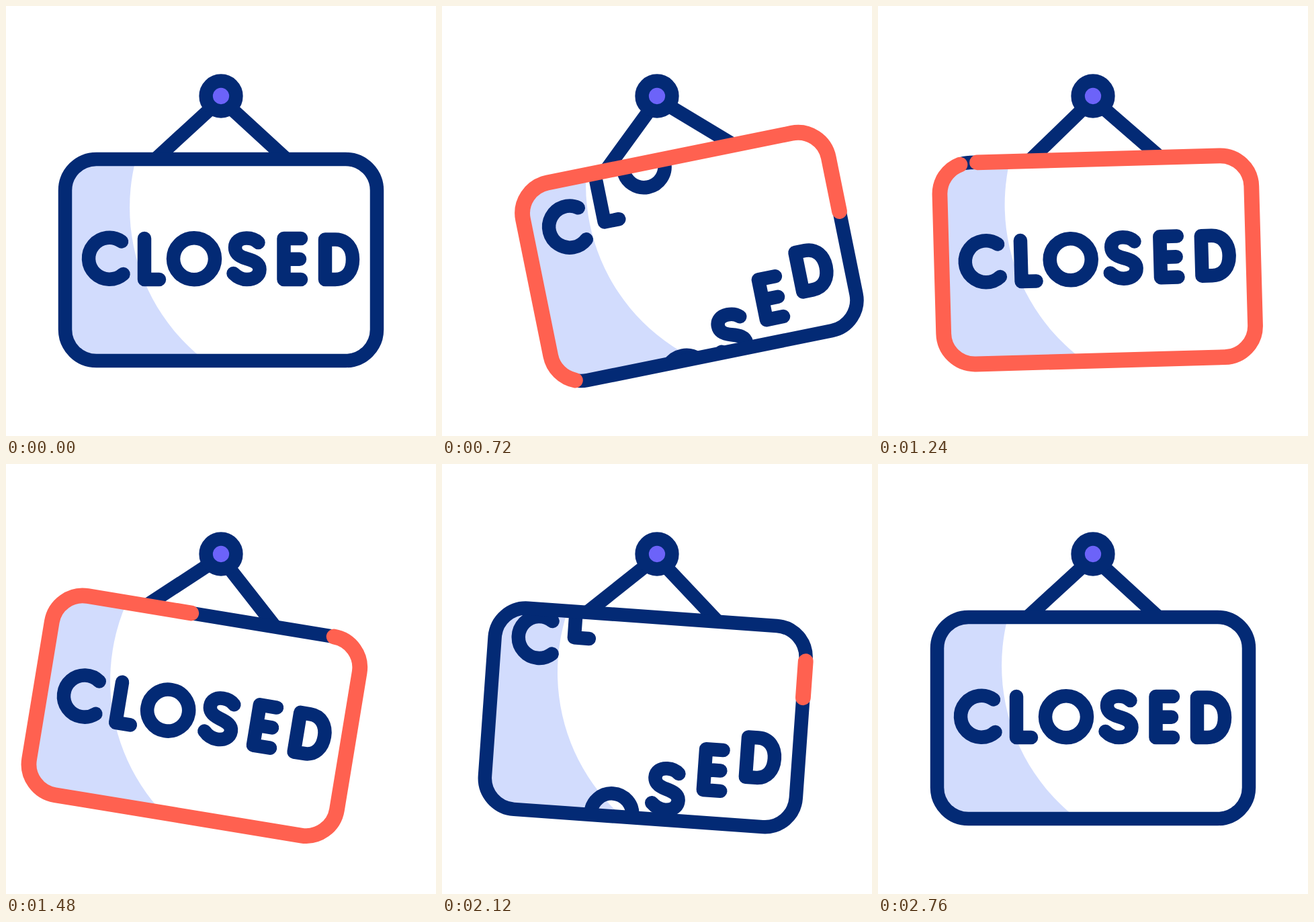
Write an HTML page that moves like this. It is 640x640 px and loops after 3 s.

```html
<!DOCTYPE html>
<html lang="en">
<head>
<meta charset="utf-8">
<title>Closed sign</title>
<style>
  html, body { margin: 0; width: 100%; height: 100%; overflow: hidden; background: #fff; }
  svg { display: block; width: 100vw; height: 100vh; }
  .line { fill: none; stroke: #032a75; stroke-width: 20.5; stroke-linecap: round; stroke-linejoin: round; }
</style>
</head>
<body>
<svg viewBox="0 0 640 640" role="img" aria-label="CLOSED">
  <defs>
    <clipPath id="inside"><rect x="88" y="228" width="464" height="300" rx="46.5"/></clipPath>
    <mask id="shade">
      <rect width="640" height="640" fill="#fff"/>
      <circle cx="471.3" cy="300" r="287.2" fill="#000"/>
    </mask>
  </defs>
  <g id="sign">
    <path class="line" d="M222.5 228 320 138.5 417.5 228"/>
    <g clip-path="url(#inside)">
      <rect x="88" y="228" width="464" height="300" fill="#fff"/>
      <rect x="88" y="228" width="240" height="300" fill="#d2dcfd" mask="url(#shade)"/>
      <g id="word"></g>
    </g>
    <rect class="line" x="88" y="228" width="464" height="300" rx="46.5"/>
    <rect id="trail" class="line" x="88" y="228" width="464" height="300" rx="46.5" pathLength="1"
      style="stroke:#ff6150;stroke-width:22.8"/>
  </g>
  <circle cx="320" cy="134" r="22.4" class="line" style="fill:#6c63f9"/>
</svg>
<script>
const LOOP = 3000, DROP_TIME = 840;
const DROPS = [
  { start: 277, stagger: 37, distance: 318 },
  { start: 1710, stagger: 33.4, distance: 332 }
];
const GLYPHS = [
  'M172 350.5A31 31 0 1 0 174.5 399',
  'M206 346V407H228',
  'M249 376.3a31 31 0 1 1 62 0a31 31 0 1 1-62 0',
  'M375.5 352C371 347.5 365 345.5 358 345.5C348 345.5 341 351 341 359.5C341 369 348 373 358 376' +
    'C370 379.5 377.5 383 377.5 392C377.5 401 370 407 358.5 407C350 407 343 402.5 338.5 398',
  'M439 346H413.5V407H439M413.5 376.7H437',
  'M475 347.5H490C507 347.5 516 361 516 377C516 394 507 407 490 407H475Z'
];
const $ = id => document.getElementById(id);
const sign = $('sign'), trail = $('trail'), word = $('word');

// Each glyph has a twin that follows it in from above.
word.innerHTML = GLYPHS.map(d => `<path class="line" d="${d}"/>`.repeat(2)).join('');
const glyphs = [...word.children];

// Progress of cubic-bezier(x1, 0, x2, 1) between two times.
function ease(t, start, end, x1 = 0.504, x2 = 0.268) {
  const x = (t - start) / (end - start);
  if (x <= 0) return 0;
  if (x >= 1) return 1;
  let lo = 0, hi = 1, s = 0.5;
  for (let i = 0; i < 24; i++) {
    s = (lo + hi) / 2;
    const r = 1 - s;
    if (3 * r * r * s * x1 + 3 * r * s * s * x2 + s ** 3 < x) lo = s; else hi = s;
  }
  return s * s * (3 - 2 * s);
}

function swing(t) {
  return -12.2 * ease(t, 205, 910) + 23.5 * ease(t, 920, 1730) - 11.3 * ease(t, 1730, 2556);
}

function drawTrail(t) {
  const tail = ease(t, 1160, 2390), length = ease(t, 160, 1400) - tail;
  const turn = 0.5187 + 0.000446 * (t - 160) - 1.146e-7 * Math.max(0, t - 1480) ** 2;
  trail.style.display = length > 0.0001 ? '' : 'none';
  trail.setAttribute('stroke-dasharray', `${length} ${1 - length}`);
  trail.setAttribute('stroke-dashoffset', -(turn + tail) % 1);
}

function drawWord(t) {
  const { start, stagger, distance } = DROPS[t < 1500 ? 0 : 1];
  glyphs.forEach((glyph, i) => {
    const begin = start + stagger * (i >> 1);
    const y = distance * (ease(t, begin, begin + DROP_TIME, 0.6, 0.2) - i % 2);
    glyph.setAttribute('transform', `translate(0 ${y})`);
  });
}

function frame(now) {
  const t = now % LOOP;
  sign.setAttribute('transform', `rotate(${swing(t)} 320 134)`);
  drawWord(t);
  drawTrail(t);
  requestAnimationFrame(frame);
}
requestAnimationFrame(frame);
</script>
</body>
</html>
```
